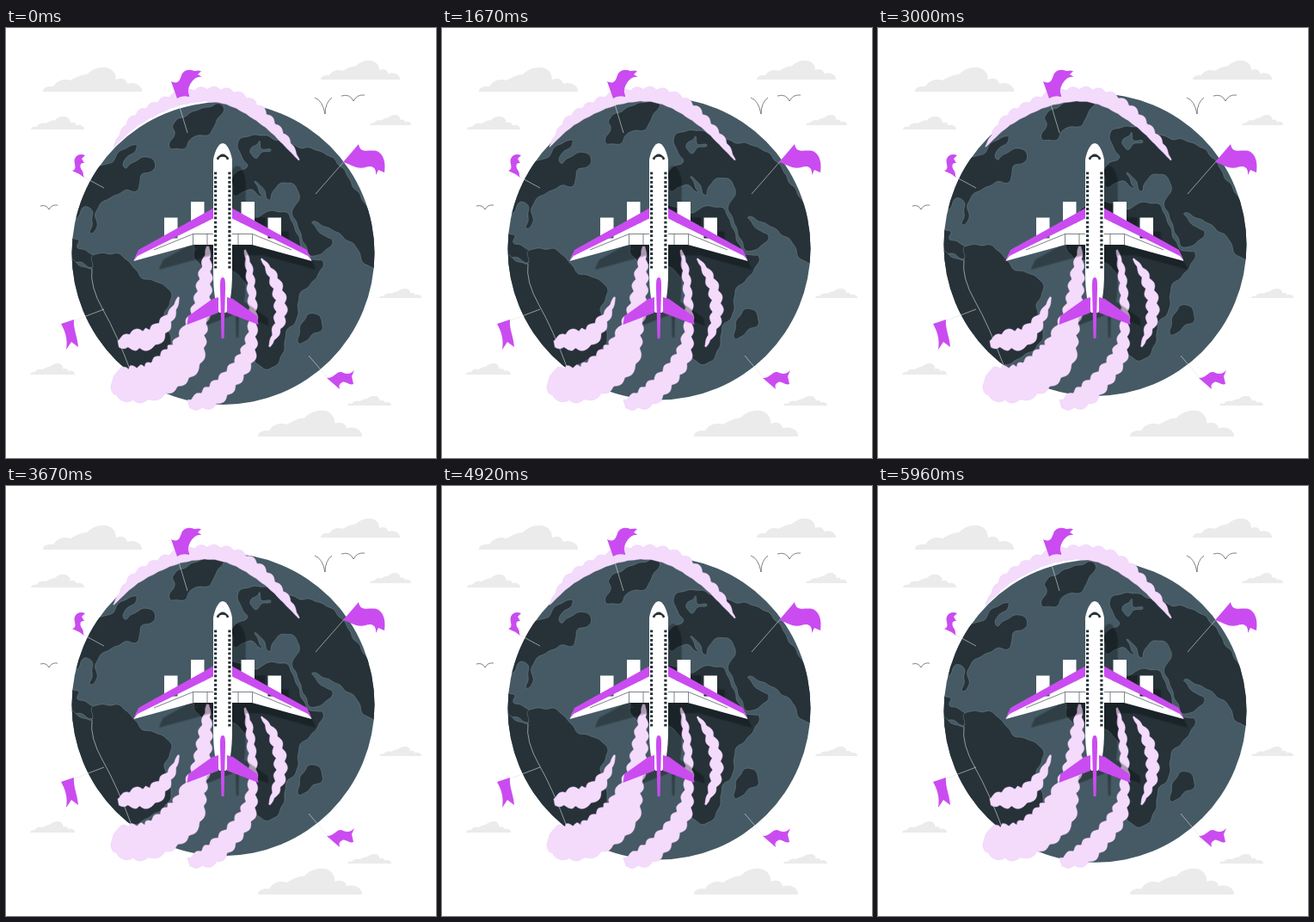
An HTML page for the animation above (6000 ms loop, 500 px wide and 500 px high).

```html
<!DOCTYPE html>
<html lang="en">
<head>
<meta charset="utf-8">
<title>Plane over a floating globe</title>
<style>
html, body { margin: 0; width: 100%; height: 100%; overflow: hidden; background: #fff; }
svg { display: block; width: 100%; height: 100%; }
.coast { fill: #263238; stroke: #8b999f; stroke-width: .4; }
.sea { fill: #455a64; stroke: #8b999f; stroke-width: .4; }
.smoke { fill: #f4dbfc; stroke: #e6bdf6; stroke-width: .4; }
.purple { fill: #ca4cf0; }
.white { fill: #fff; }
.dark { fill: #263238; }
.pole { fill: none; stroke: #dfe3e5; stroke-width: .6; }
.thin { fill: none; stroke: #263238; stroke-width: .6; }
#shadow * { fill: #000; stroke: none; }
</style>
</head>
<body>
<svg viewBox="0 0 500 500">
  <defs><clipPath id="disc"><circle cx="252.5" cy="262" r="176"/></clipPath></defs>
  <g id="clouds" fill="#ebebeb"></g>
  <path class="thin" d="M359 81Q368 84 371 100Q371 87 379 81M390 79Q400 76 404 85Q408 77 417 78M40 207Q47 205 50 211Q53 205 60 206"/>
  <g id="globe">
    <circle cx="252.5" cy="262" r="176" fill="#455a64"/>
    <g id="land" clip-path="url(#disc)"></g>
  </g>
  <g id="smoke"></g>
  <g id="shadow" opacity=".3" transform="translate(47.2 42.4) scale(.88)"></g>
  <g id="flags"></g>
  <g id="plane"></g>
</svg>
<script>
const $ = id => document.getElementById(id);
const path = (d, cls) => `<path class="${cls}" d="${d}"/>`;

// Catmull-Rom samples through "x,y x,y ..." keys; any extra value is eased along too
function spline(text, closed, steps = 24) {
  const keys = text.split(' ').map(s => s.split(',').map(Number)), n = keys.length;
  const at = i => keys[closed ? (i + n) % n : Math.max(0, Math.min(n - 1, i))];
  const out = [];
  for (let i = 0; i < (closed ? n : n - 1); i++)
    for (let s = 0; s < steps; s++) {
      const u = s / steps, [a, b, c, d] = [-1, 0, 1, 2].map(k => at(i + k));
      out.push(b.map((v, k) => v + u / 2 * (c[k] - a[k] +
        u * (2 * a[k] - 5 * v + 4 * c[k] - d[k] + u * (3 * (v - c[k]) + d[k] - a[k])))));
    }
  return out;
}

// Calls f with each sample, its unit normal and the length walked so far
function walk(points, f) {
  let length = 0;
  return points.map((p, i) => {
    const q = points[i + 1] || p, o = points[i - 1] || p;
    const dx = q[0] - o[0], dy = q[1] - o[1], m = Math.hypot(dx, dy) || 1;
    length += Math.hypot(p[0] - o[0], p[1] - o[1]);
    return f(p, dy / m, -dx / m, length);
  });
}
const outline = points => 'M' + points.map(p => p.map(v => v.toFixed(2))).join('L') + 'Z';
const shift = (p, nx, ny, d) => [p[0] + nx * d, p[1] + ny * d];

// Coast: smooth shape with a slight ripple
const coast = (keys, cls = 'coast') => path(outline(walk(spline(keys, true), (p, nx, ny, l) =>
  shift(p, nx, ny, Math.sin(l / 2.6) * .6 + Math.sin(l / 4.3) * .6))), cls);

// Smoke: "x,y,halfWidth" spine whose two edges are scalloped
function smoke(keys, inner = 1) {
  const edge = (side, puff, phase) => walk(spline(keys), (p, nx, ny, l) => {
    const bump = Math.abs(Math.sin(l / 4.6 + phase)) - .6;
    return shift(p, nx, ny, side * (p[2] + puff * Math.min(p[2] * .5, 3.5) * bump));
  });
  return path(outline([...edge(1, 1, 0), ...edge(-1, inner, 1).reverse()]), 'smoke');
}

// Left, baseline, width, height
$('clouds').innerHTML = [
  [43, 74, 115, 28], [366, 60, 92, 22], [293, 475, 121, 30], [29, 118, 62, 15],
  [423, 113, 48, 12], [434, 314, 49, 11], [28, 403, 52, 13], [397, 439, 51, 11]
].map(([x, y, w, h]) => `<path transform="translate(${x} ${y}) scale(${w / 115} ${h / 28})"
  d="M0 0C0-5 6-7 12-6C18-15 26-15 32-13C39-17 45-20 51-20C58-27 66-29 74-28C82-26 85-20 85-14C92-17 97-14 98-9C106-12 116-7 115 0Z"/>`).join('');

$('land').innerHTML = [
  // Americas
  '90,170 112,159 124,157 129,146 151,135 151,141 137,155 140,163 152,153 168,151 174,163 158,171 153,188 134,191 106,209 106,231 98,237 101,215 92,208 78,222 66,200',
  '66,246 84,246 84,256 101,263 100,278 84,272 66,268',
  '66,266 86,276 99,280 102,264 130,263 145,274 157,289 177,296 190,304 191,320 184,335 192,365 183,382 148,402 110,410 66,340',
  // Greenland
  '190,138 196,122 194,112 214,99 245,89 254,95 243,110 238,123 219,126 209,138 198,141',
  // Africa
  '245,213 270,213 292,220 306,213 328,217 341,246 352,268 368,270 362,289 341,312 339,338 327,352 320,384 303,397 289,384 284,345 281,305 262,281 228,278 219,250',
  // Europe and Asia
  '270,132 290,124 316,130 340,138 365,143 388,159 404,184 424,215 450,270 420,277 408,256 388,240 370,230 356,226 366,239 379,246 372,259 354,264 343,240 333,212 341,200 338,186 323,179 312,188 306,199 296,183 289,179 298,196 284,188 266,194 264,172 280,160 272,146',
  // Madagascar
  '349,336 363,333 368,348 357,357 342,367 340,356'
].map(keys => coast(keys)).join('') +
  coast('284,143 291,136 295,131 297,140 307,142 297,146 290,151', 'sea') +
  path('M100 280Q97 300 113 328T146 402', 'pole');

$('smoke').innerHTML =
  smoke('125,138,.5 149,109,6 184,89,7 212,80,7.5 240,77.5,8 266,83,9 290,97,8.5 310,115,6 327,134,4.5 341,154,.5', .15) +
  smoke('235,254,1.5 232,285,7 227,325,10 219,352,14 206,384,22 172,410,21 145,414,20 131,411,16 124,409,7') +
  smoke('201,313,1 191,335,5 171,359,11 150,363,11 130,367,4') +
  smoke('278,258,1 283,282,4 286,312,4.5 287,335,5 286,356,5.5 280,382,9.5 262,407,11 238,429,12 212,438,5') +
  smoke('297,268,.8 310,288,5 318,312,6.5 319,335,6.5 314,353,4.5 306,371,.8');

const poles = 'M199 82L211 122M90 173L114 186M395 153L360 193M80 340L114 327M375 408L352 381';
$('flags').innerHTML = path(poles, 'pole') + [
  'M192 62C200 66 202 61 204 55C207 48 214 48 219 50Q224 49 227 50L223 54L228 57C221 56 216 61 213 68C210 75 214 78 213 80Q204 78 199 82Z',
  'M77 166C84 164 78 157 80 152C82 147 87 146 92 148L88 152L91 157C85 156 86 162 88 165C91 169 89 171 91 174Q85 169 77 166Z',
  'M410 135C412 147 422 141 431 143C438 146 442 154 440 168L433 165L430 171C431 160 423 160 418 162C408 165 400 158 392 156Z',
  'M64 344L79 339C78 350 83 358 84 371L76 365L70 374C72 362 69 353 64 344Z',
  'M373 407C382 407 384 399 390 400C395 402 399 404 405 398L402 405L404 414C399 416 395 410 391 412Q386 414 388 420Z'
].map(d => path(d, 'purple')).join('');

const mirror = s => s + `<g transform="matrix(-1 0 0 1 504 0)">${s}</g>`;
const wing = path('M215 202h15.500v25h-15.500zM184 220.500h15.500v24h-15.500zM242 218L152 263L148.500 271L218 252H242Z', 'white') +
  path('M242 209L154 258L148.500 270.500L153 265L242 221Z', 'purple') +
  path('M172 258L217.500 239.500H242M217.500 239.500V252M234 239.500V252', 'thin');
const tail = path('M247 313L240 315L212 335L210.500 345L247 331Z', 'purple');
const body = path('M252 134C247 134 243 143 241 153V285C241 307 244 324 248 331H256C260 324 263 307 263 285V153C261 143 257 134 252 134Z', 'white');
const fin = path('M252 290C249 290 249 295 249 303L250.500 361H253.500L255 303C255 295 255 290 252 290Z', 'purple');
const craft = mirror(wing) + body + mirror(tail) + fin;

let panes = 'M244.500 152Q252 141 259.500 152L257 153.500L255.500 150.500Q252 149 248.500 150.500L247 153.500Z';
for (let y = 167.5; y < 279; y += 5.2)
  panes += `M242 ${y}h3.200v2.800h-3.200zM258.300 ${y}h3.200v2.800h-3.200z`;

$('plane').innerHTML = craft + path(panes, 'dark');
$('shadow').innerHTML = craft;

// The globe drifts up 10 px and back at constant speed
function draw(now) {
  const t = now % 6000 / 3000;
  $('globe').setAttribute('transform', `translate(0 ${-10 * (1 - Math.abs(1 - t))})`);
  requestAnimationFrame(draw);
}
draw(performance.now());
</script>
</body>
</html>
```
